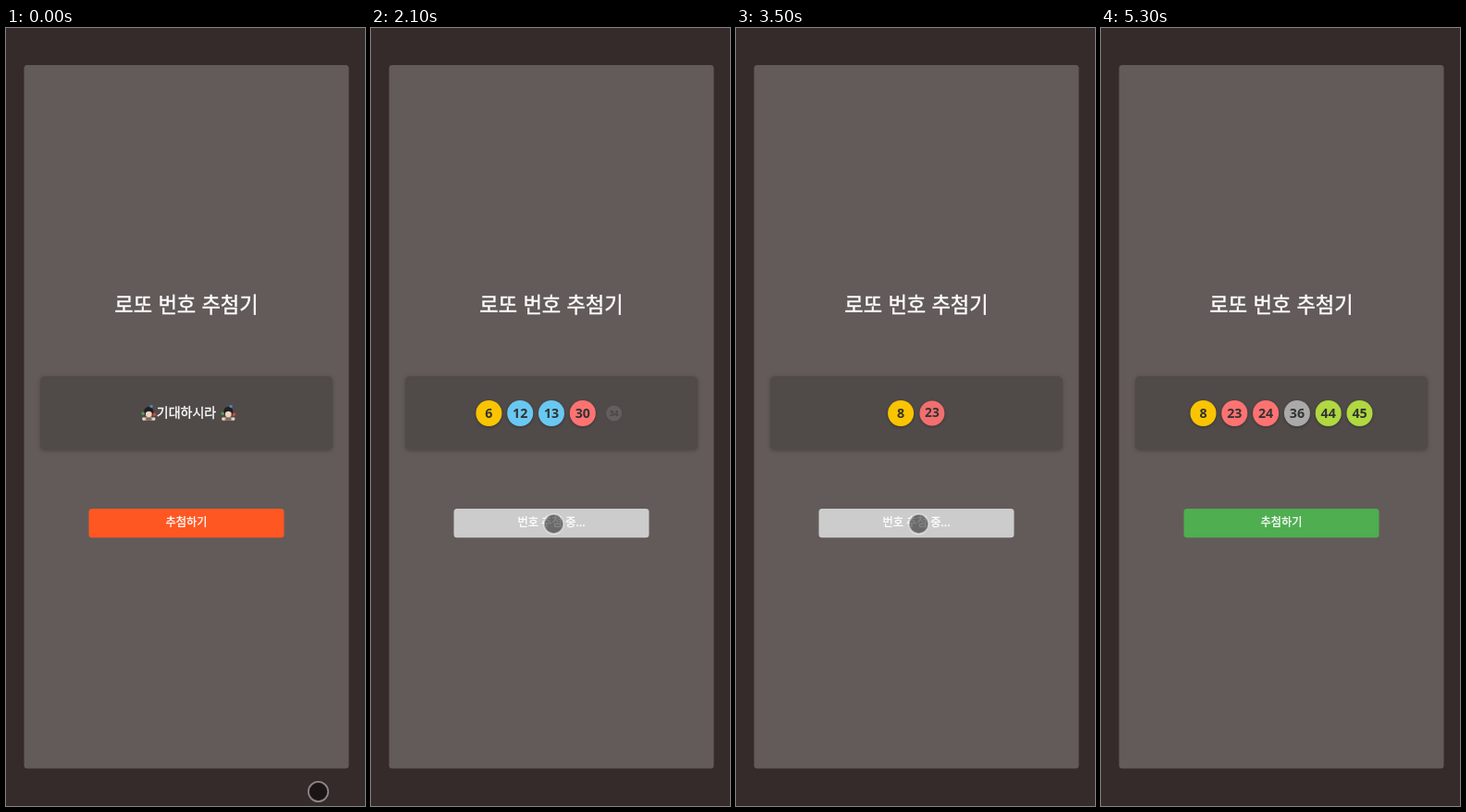
Recreate the animation shown at these times as an HTML page. Size 388x840 px, loop 5.5 s.

```html
<!DOCTYPE html>
<html lang="ko">
<head>
<meta charset="utf-8">
<title>로또 번호 추첨기</title>
<style>
  html, body { margin: 0; width: 100%; height: 100%; overflow: hidden; background: #352b2a; }
  svg { display: block; width: 100vw; height: 100vh; }
  text { font-family: "Noto Sans CJK KR", "Noto Sans CJK", sans-serif; text-anchor: middle; fill: #fff; }
  .title { font-size: 22.2px; font-weight: 500; stroke: #fff; stroke-width: .4px; }
  .wait { font-size: 14px; font-weight: 500; stroke: #fff; stroke-width: .35px; }
  .label { font-size: 12.2px; font-weight: 500; stroke: #fff; stroke-width: .3px; }
  .ball text { font: 600 14.2px "Noto Sans", "Open Sans", sans-serif; fill: #333; }
  .ball circle { filter: drop-shadow(0 1.5px 1.5px rgba(0, 0, 0, .3)); }
  .panel { filter: drop-shadow(0 1px 2px rgba(0, 0, 0, .25)); }
</style>
</head>
<body>
<svg viewBox="0 0 388 840" preserveAspectRatio="none">
  <defs>
    <g id="juggler">
      <path d="M-6.5 8.5Q-6 4.5 0 4.5T6.5 8.5Z" fill="#c9b79c"/>
      <rect x="-3" y="5" width="6" height="3.5" fill="#756c62"/>
      <circle cx="-5.5" cy="6.6" r="1.7" fill="#f0d3bd"/>
      <circle cx="5.5" cy="6.6" r="1.7" fill="#f0d3bd"/>
      <ellipse cy="-1.2" rx="5" ry="5" fill="#211e20"/>
      <ellipse cy="1.4" rx="3.4" ry="3.6" fill="#f0d3bd"/>
      <path d="M-3.6 0Q0 -3 3.6 0L3.4 -2.4H-3.4Z" fill="#211e20"/>
      <circle cx="2.8" cy="-6.8" r="1.7" fill="#4d82b8"/>
      <circle cx="-6.2" cy="1" r="1.7" fill="#4c9a52"/>
      <circle cx="6.2" cy="2" r="1.7" fill="#c94c42"/>
    </g>
  </defs>
  <rect width="388" height="840" fill="#352b2a"/>
  <rect x="19.5" y="40" width="351" height="759.5" rx="3.5" fill="#635b59"/>
  <text class="title" x="195" y="307">로또 번호 추첨기</text>
  <rect class="panel" x="37" y="376" width="316" height="79.5" rx="5" fill="#504a49"/>
  <g id="wait">
    <use href="#juggler" x="154.3" y="415.3"/>
    <text class="wait" x="195" y="419.5">기대하시라</text>
    <use href="#juggler" x="240.3" y="415.3"/>
  </g>
  <g id="balls"></g>
  <rect id="button" x="89.5" y="519" width="211" height="31.2" rx="3.5"/>
  <text id="label" class="label" x="195" y="537.8"></text>
  <rect id="tap" x="89.5" y="519" width="211" height="31.2" rx="3.5" fill="#33b5e5" opacity=".4"/>
  <g id="cursor">
    <circle r="10.6" fill="#000" fill-opacity=".48"/>
    <circle r="10.6" fill="none" stroke="#fff" stroke-opacity=".45" stroke-width="1.8"/>
  </g>
</svg>
<script>
const LOOP = 5500, STEP = 100;
const BALL_GAP = 250, BALL_TIME = 300, FADE = 200, PITCH = 33.8;
const ORANGE = [255, 87, 34], GREY = [204, 204, 204], GREEN = [78, 174, 80];
const COLORS = ['#fbc400', '#69c8f2', '#ff7272', '#aaaaaa', '#b0d840'];
const ROUNDS = [
  { start: 1035, from: ORANGE, numbers: [6, 12, 13, 30, 34, 43] },
  { start: 3035, from: GREEN, numbers: [8, 23, 24, 36, 44, 45] }
];

const $ = id => document.getElementById(id);
const clamp = x => Math.min(1, Math.max(0, x));
const show = (el, on) => el.setAttribute('display', on ? 'inline' : 'none');
const mix = (a, b, k) => `rgb(${a.map((v, i) => Math.round(v + (b[i] - v) * k))})`;

// CSS "ease": cubic-bezier(.25, .1, .25, 1)
function ease(x) {
  x = clamp(x);
  let lo = 0, hi = 1;
  for (let i = 0; i < 24; i++) {
    const s = (lo + hi) / 2, r = 1 - s;
    if (.75 * r * r * s + .75 * r * s * s + s * s * s < x) lo = s; else hi = s;
  }
  const s = lo, r = 1 - s;
  return .3 * r * r * s + 3 * r * s * s + s * s * s;
}

const inOut = x => x < .5 ? 4 * x ** 3 : 1 - 4 * (1 - x) ** 3;

const balls = ROUNDS[0].numbers.map(() => {
  const ns = 'http://www.w3.org/2000/svg';
  const g = document.createElementNS(ns, 'g');
  const disc = document.createElementNS(ns, 'circle');
  const text = document.createElementNS(ns, 'text');
  g.setAttribute('class', 'ball');
  disc.setAttribute('r', 14);
  text.setAttribute('y', 4.5);
  g.append(disc, text);
  $('balls').append(g);
  return { g, disc, text };
});

function drawBalls(round, t) {
  const age = round ? t - round.start - 15 : -1;
  const count = Math.min(balls.length, Math.floor(age / BALL_GAP) + 1);
  balls.forEach(({ g, disc, text }, i) => {
    show(g, i < count);
    if (i >= count) return;
    const n = round.numbers[i];
    const k = ease((age - i * BALL_GAP) / BALL_TIME);
    const x = 195 + (i - (count - 1) / 2) * PITCH;
    disc.setAttribute('fill', COLORS[Math.floor((n - 1) / 10)]);
    text.textContent = n;
    g.setAttribute('transform', `translate(${x} 416) scale(${.5 + .5 * k})`);
    g.setAttribute('opacity', k);
  });
}

function drawButton(round, t) {
  const age = round ? t - round.start : -1;
  const end = balls.length * BALL_GAP;
  const busy = age >= 0 && age < end;
  const fill = !round ? mix(ORANGE, ORANGE, 0)
    : busy ? mix(round.from, GREY, ease(age / FADE))
    : mix(GREY, GREEN, ease((age - end) / FADE));
  $('button').setAttribute('fill', fill);
  $('label').textContent = busy ? '번호 추첨 중...' : '추첨하기';
  show($('tap'), age >= 0 && age < 150);
}

function drawCursor(t) {
  const k = inOut(clamp((t - 50) / 650));
  $('cursor').setAttribute('transform', `translate(${337.5 - 140 * k} ${824.5 - 289 * k})`);
  show($('cursor'), t < 5300);
}

function render(time) {
  const t = Math.floor(time % LOOP / STEP) * STEP;
  const round = ROUNDS.filter(r => t >= r.start).pop();
  show($('wait'), !round);
  drawBalls(round, t);
  drawButton(round, t);
  drawCursor(t);
}

const begin = performance.now();
function tick() {
  render(performance.now() - begin);
  requestAnimationFrame(tick);
}
tick();
</script>
</body>
</html>
```
